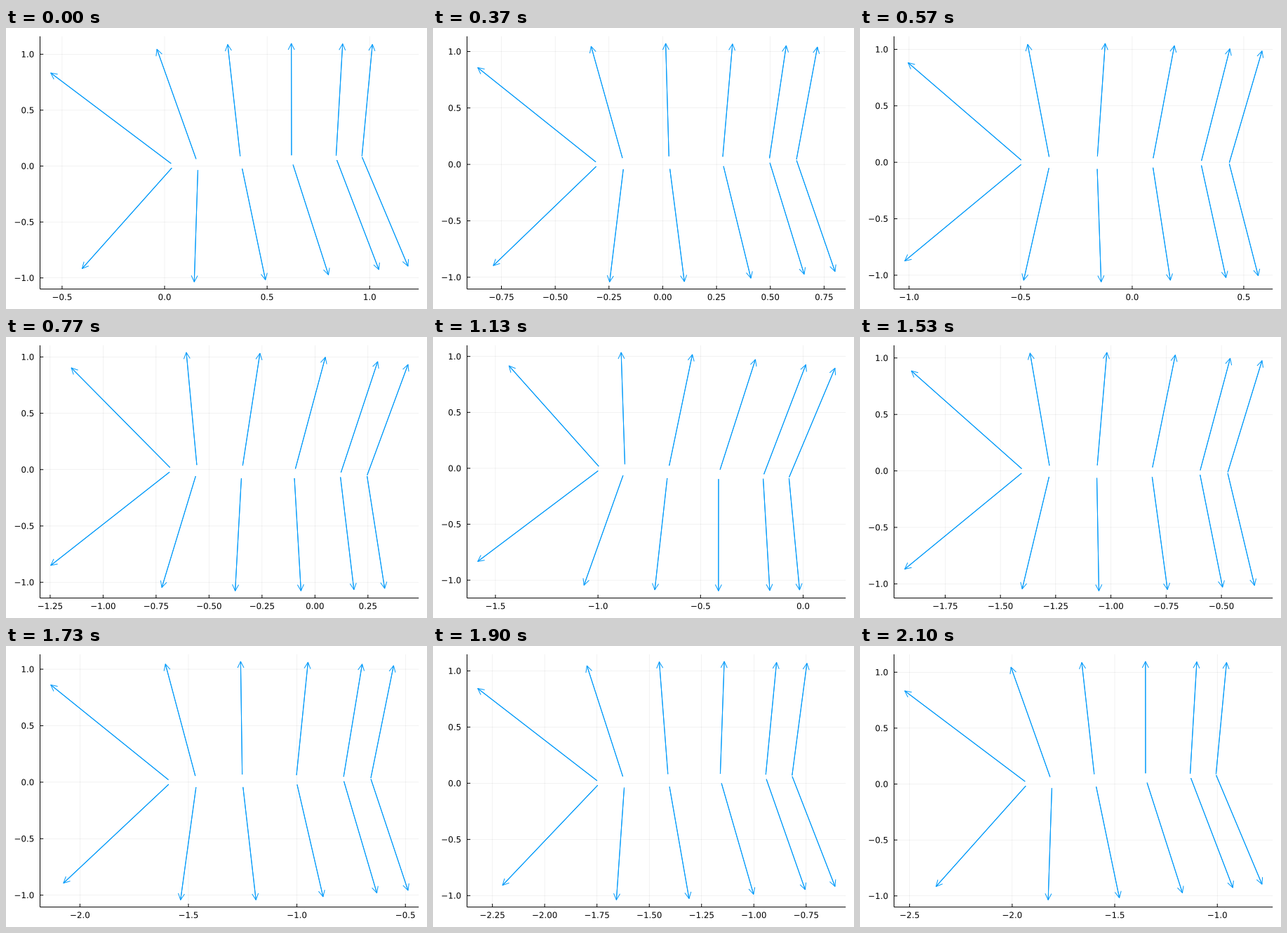
Animation, 600 px wide and 400 px high, one loop 2.13 s. Source, as a matplotlib script:

```python
import numpy as np
import matplotlib.pyplot as plt
from matplotlib.animation import FuncAnimation
from matplotlib.collections import LineCollection
from matplotlib.patches import PathPatch
from matplotlib.path import Path
from matplotlib.textpath import TextPath

W, H, DPI = 600, 400, 100
FRAMES, LOOP_MS = 64, 2130
LEFT, RIGHT, TOP, BOTTOM = 48.5, 588.19, 11.81, 371.61
EM = 11.85                      # label font size in pixels
BLUE = "#009AFA"
PX = 72 / DPI                   # one pixel in points
PITCH = np.radians(5)
PANELS = 6                      # per side of the foil
HEAD_LEN, HEAD_HALF = 9, 4.5

plt.rcParams["font.family"] = "DejaVu Sans"
fig = plt.figure(figsize=(W / DPI, H / DPI), dpi=DPI, facecolor="white")
ax = fig.add_axes([0, 0, 1, 1])


def foil_panels():
    """Midpoints and outward unit normals of a 12 % thick symmetric foil."""
    x = 0.5 * (1 - np.cos(np.linspace(0, np.pi, PANELS + 1)))
    y = 0.6 * (0.2969 * np.sqrt(x) - 0.126 * x - 0.3516 * x**2
               + 0.2843 * x**3 - 0.1036 * x**4)
    mids, normals = [], []
    for side in (1, -1):
        nodes = np.column_stack([x, side * y])
        d = np.diff(nodes, axis=0)
        d /= np.hypot(*d.T)[:, None]
        mids.append((nodes[1:] + nodes[:-1]) / 2)
        normals.append(side * np.column_stack([-d[:, 1], d[:, 0]]))
    return np.vstack(mids), np.vstack(normals)


MIDS, NORMALS = foil_panels()


def pose(i):
    """Pitch about the nose while swimming left at constant speed."""
    a = PITCH * np.cos(2 * np.pi * i / FRAMES)
    rot = np.array([[np.cos(a), np.sin(a)], [-np.sin(a), np.cos(a)]])
    base = MIDS @ rot + [-2 * i / FRAMES, 0]
    return base, base + NORMALS @ rot


def limits(v):
    pad = 0.03 * (v.max() - v.min())
    return v.min() - pad, v.max() + pad


def ticks(lo, hi):
    """Best-scoring tick step with 4 to 8 ticks; returns values and labels."""
    best = None
    for step, nice in ((0.5, 0.9), (0.2, 0.7), (0.25, 0.5), (0.3, 0.2)):
        n = np.arange(np.ceil(lo / step), np.floor(hi / step) + 1)
        if not 4 <= len(n) <= 8:
            continue
        grain = 1 - abs(len(n) - 5) / 5
        cover = 1.5 * (hi - lo) / ((len(n) - 1) * step)
        score = grain / 4 + cover / 3 + nice / 4
        if best is None or score > best[0]:
            best = score, n * step, 2 if step == 0.25 else 1
    _, values, digits = best
    labels = [("\u2212" if v < -1e-9 else "") + f"{abs(v):.{digits}f}"
              for v in values]
    return values, labels


def lines(segs, color, width=1.0, alpha=None):
    ax.add_collection(LineCollection(segs, colors=color, linewidths=width * PX,
                                     alpha=alpha, snap=False),
                      autolim=False)


def label(x, y, s, align):
    """Text outline with its baseline at y; align is the share left of x."""
    width = EM * sum({"\u2212": 0.838, ".": 0.318}.get(c, 0.636) for c in s)
    p = TextPath((0, 0), s, size=EM)
    verts = p.vertices * [1, -1] + [x - align * width, y]
    ax.add_patch(PathPatch(Path(verts, p.codes), fc="black", lw=0, snap=False))


def draw(i):
    ax.clear()
    ax.set(xlim=(0, W), ylim=(H, 0))
    ax.axis("off")

    base, tip = pose(i)
    pts = np.vstack([base, tip])
    x0, x1 = limits(pts[:, 0])
    y0, y1 = limits(pts[:, 1])

    def px(x):
        return LEFT + (x - x0) / (x1 - x0) * (RIGHT - LEFT)

    def py(y):
        return BOTTOM - (y - y0) / (y1 - y0) * (BOTTOM - TOP)

    xv, xs = ticks(x0, x1)
    yv, ys = ticks(y0, y1)
    xt, yt = px(xv), py(yv)

    lines([[(x, BOTTOM), (x, TOP)] for x in xt]
          + [[(LEFT, y), (RIGHT, y)] for y in yt], "black", 0.5, 0.1)
    lines([[(LEFT, BOTTOM), (RIGHT, BOTTOM)], [(LEFT, BOTTOM), (LEFT, TOP)]]
          + [[(x, BOTTOM), (x, BOTTOM - 4.72)] for x in xt]
          + [[(LEFT, y), (LEFT + 4.72, y)] for y in yt], "black")
    for x, s in zip(xt, xs):
        label(x, 387.2, s, 0.5)
    for y, s in zip(yt, ys):
        label(40.27, y + 4.31, s, 1)

    a = np.column_stack([px(base[:, 0]), py(base[:, 1])])
    b = np.column_stack([px(tip[:, 0]), py(tip[:, 1])])
    u = (b - a) / np.hypot(*(b - a).T)[:, None]
    side = HEAD_HALF * np.column_stack([-u[:, 1], u[:, 0]])
    back = b - HEAD_LEN * u
    shafts = list(np.stack([a, b], axis=1))
    heads = list(np.stack([back + side, b, back - side], axis=1))
    # the shaft is stroked twice, so it looks firmer than the head
    lines(shafts, BLUE)
    lines(shafts + heads, BLUE)
    return []


anim = FuncAnimation(fig, draw, frames=FRAMES, init_func=lambda: [],
                     interval=LOOP_MS / FRAMES, repeat=True, repeat_delay=0)
plt.show()
```
